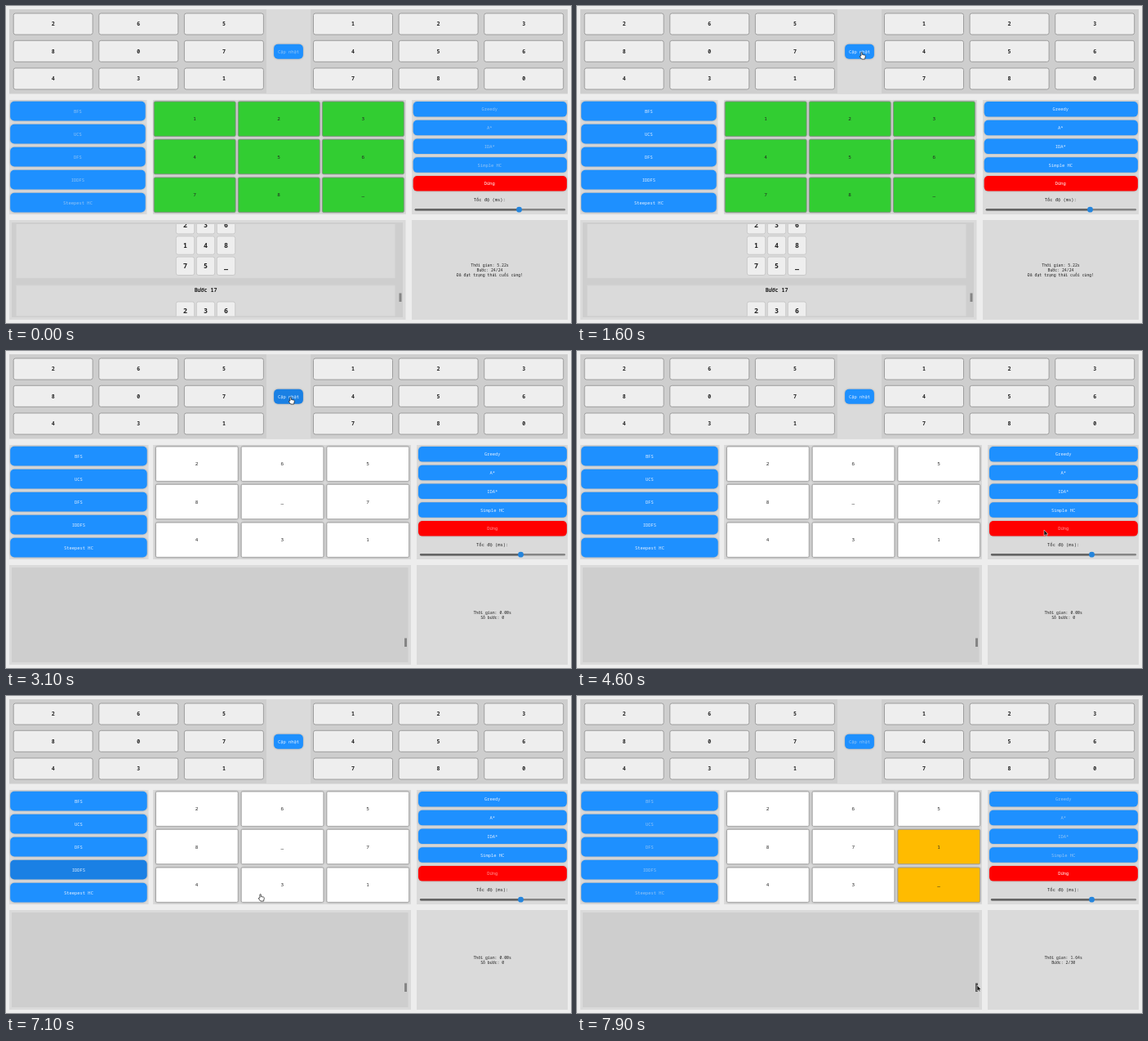
Animation of 692 by 388 pixels, one loop 8000 ms. Source, as an HTML page:

```html
<!DOCTYPE html>
<html lang="vi">
<head>
<meta charset="utf-8">
<style>
html, body { margin: 0; width: 100%; height: 100%; overflow: hidden; background: #ededed; }
svg { display: block; width: 692px; height: 388px; }
text { font-family: "Noto Sans Mono", "DejaVu Sans Mono", monospace; text-anchor: middle; white-space: pre; }
.lift { filter: drop-shadow(0 .6px .8px rgba(0, 0, 0, .25)); }
</style>
</head>
<body>
<svg viewBox="0 0 692 388">
  <defs>
    <clipPath id="list"><rect x="7" y="267" width="476" height="112.5"/></clipPath>
  </defs>
  <g id="scene"></g>
  <g id="cursor">
    <path id="arrow" d="M0 0V7.2L1.7 5.7L2.8 8L4 7.4L2.9 5.2H5Z" fill="#111" stroke="#fff" stroke-width=".5"/>
    <path id="hand" d="M1.2 4.6V.7Q1.8-.3 2.5.7V3L5.6 3.7Q6.4 4 6.2 5L5.5 8.2H2L-.3 5.3Q-.2 4 1.2 4.6Z" fill="#fff" stroke="#222" stroke-width=".7" transform="translate(-.9 -.8) scale(1.08)"/>
  </g>
</svg>
<script>
const LOOP = 8000, BLUE = '#1e90ff', HOVER = '#1a80e4', PANEL = '#dadada';
const $ = id => document.getElementById(id);
const rows = [9, 42.3, 76], boardRows = [117, 163.3, 210];

// Cursor stops: time, x, y, kind
const path = [
  [600, 590, 219, 'hand'], [900, 520, 160, 'hand'], [1300, 374, 75, 'hand'],
  [1500, 347.5, 57, 'hand'], [3800, 347.5, 57, 'hand'], [4300, 560, 236, 'arrow'],
  [4600, 572, 219, 'arrow'], [4800, 571, 217, 'arrow'], [5400, 347, 57, 'hand'],
  [5700, 345, 57, 'hand'], [6300, 130, 213, 'hand'], [6600, 131, 214, 'hand'],
  [7100, 310.5, 243, 'hand'], [7400, 484, 336, 'arrow'], [7500, 490, 354, 'arrow'],
  [8000, 490, 354, 'arrow']
];

const rect = (x, y, w, h, fill, r = 0, stroke = 'none') =>
  `<rect x="${x}" y="${y}" width="${w}" height="${h}" rx="${r}" fill="${fill}" stroke="${stroke}" stroke-width=".8"/>`;
const text = (s, x, y, size = 5.45, fill = '#222', weight = 400) =>
  `<text x="${x}" y="${y + size * .36}" font-size="${size}" fill="${fill}" font-weight="${weight}">${s}</text>`;
const button = (s, x, y, w, h, fill, ink, tx = x + w / 2) =>
  rect(x, y, w, h, fill, 5) + text(s, tx, y + h / 2, 5.45, ink);
const lift = body => `<g class="lift">${body}</g>`;
const inkFor = s => s.busy ? '#93c4f4' : '#e2efff';

function inputGrid(x, digits) {
  return [...digits].map((d, i) => {
    const cx = x + (i % 3) * 104.6, cy = rows[i / 3 | 0];
    return rect(cx, cy, 97, 26, '#eee', 2.5, '#8d8d8d') + text(d, cx + 48.5, cy + 13, 6.6, '#222', 700);
  }).join('');
}

function board(s) {
  const [x, step, w] = s.wide ? [183.5, 104.7, 100.7] : [181.3, 103.1, 99.8];
  const cells = [...s.board].map((d, i) => {
    const col = i % 3, cx = x + col * step, cy = boardRows[i / 3 | 0];
    const fill = s.done ? '#32cd32' : s.moved.includes(i) ? '#ffbb00' : '#fff';
    let cell = rect(cx, cy, w, 42.4, fill, 1.5, s.done ? '#7f8f7f' : '#989898');
    // Leftover edge of the narrower layout
    if (s.torn) cell += rect(cx + .4, cy - 1, 1.8 + col * 1.6, 44.4, '#dedede') +
      rect(cx + 1.8 + col * 1.6, cy, .8, 42.4, '#989898');
    return cell + text(d, cx + w / 2 - .2, cy + 21.2, 6);
  }).join('');
  return rect(180, 115, s.wide ? 316 : 310, 140, PANEL) + lift(cells);
}

function tiles(y, digits) {
  return [...digits].map((d, i) => {
    const x = 208.3 + (i % 3) * 25, ty = y + (i / 3 | 0) * 25.3;
    return rect(x, ty, 22.4, 22.4, '#eee', 2.5, '#c2c2c2') + text(d, x + 11.2, ty + 11.2, 8.3, '#222', 700);
  }).join('');
}

function log(s) {
  const w = s.wide ? 492 : 485.5;
  let out = rect(4, 262, w, 122, PANEL) + rect(7, 265, w - 6.5, 116, '#cecece');
  if (s.torn) out += rect(486, 265, 8.5, 116, PANEL) + rect(494, 262, 1.5, 122, '#d2d2d2');
  if (s.done) out += '<g clip-path="url(#list)">' +
    rect(12.5, 255, 464, 78, PANEL, 1, '#d4d4d4') + tiles(256.5, '23614875_') +
    rect(12.5, 342, 464, 60, PANEL, 1, '#d4d4d4') + text('Bước 17', 244.5, 348, 6.6, '#222', 700) +
    tiles(362, '236') + '</g>';
  return out + rect(s.wide ? 488 : 481.5, 351.5, 3, 10.5, s.dragging ? '#555' : '#858585');
}

function side(s) {
  const x = s.wide ? 503 : 497, bx = s.wide || s.torn ? 505 : 498.7, mid = s.wide ? 595.7 : 592.3;
  const cut = word => s.torn && word != 'Greedy' ? ' ' + word.slice(1) : word;
  let out = rect(x, 115, 688 - x, 140, PANEL), buttons = '';
  ['Greedy', 'A*', 'IDA*', 'Simple HC', 'Dừng'].forEach((name, i) => {
    const y = 117 + i * 22.75, stop = i == 4;
    const fill = stop ? (s.stopHover ? '#cc0000' : '#f00') : BLUE;
    if (s.torn) buttons += rect(498.7, y, 4, 18.6, fill, 1.5);
    buttons += button(cut(name), bx, y, 686.9 - bx, 18.6, fill, stop ? s.stopInk : inkFor(s), mid);
  });
  out += lift(buttons);
  const sx = bx + 2, knob = s.wide || s.torn ? 630.5 : 628.5;
  out += text(cut('Tốc độ (ms):'), mid, 236.8);
  if (s.torn) out += rect(503, 115, 1.5, 140, '#e6e6e6') + rect(500.7, 248, 2, 2.4, '#666');
  out += rect(sx, 248, 685 - sx, 2.4, '#858585', 1.2) + rect(sx, 248, knob - sx, 2.4, '#656565', 1.2) +
    `<circle cx="${knob}" cy="249.2" r="3.4" fill="#2585dc"/>`;
  out += rect(x, 262, 688 - x, 122, PANEL);
  const top = 323.2 - (s.status.length - 1) * 3;
  s.status.forEach((line, i) => out += text(line, s.done ? 592.5 : 595.7, top + i * 6, 4.85));
  return out;
}

function scene(s) {
  const lw = s.wide ? 167.5 : 165.5;
  const left = ['BFS', 'UCS', 'DFS', 'IDDFS', 'Steepest HC'].map((name, i) =>
    button(name, 5.2, 116.8 + i * 28, lw, 23.7, s.leftHover == i ? HOVER : BLUE, inkFor(s))).join('');
  return rect(4, 4, 684, 103.5, '#cecece') + rect(319, 4, 54, 103.5, PANEL) +
    inputGrid(9.2, '265807431') + inputGrid(376.5, '123456780') +
    lift(button('Cập nhật', 328.1, 46.7, 35.8, 18, s.updateHover ? HOVER : BLUE, inkFor(s))) +
    rect(4, 115, lw + 3, 140, PANEL) + lift(left) + board(s) + log(s) + side(s);
}

function stateAt(t) {
  const s = { moved: [], busy: false, wide: t >= 1900, stopInk: '#fff' };
  if (t < 1700) return {
    ...s, board: '12345678_', done: true, busy: t < 1500, stopHover: t >= 600 && t < 1500,
    status: ['Thời gian: 5.22s', 'Bước: 24/24', 'Đã đạt trạng thái cuối cùng!']
  };
  s.torn = t < 1900;
  s.status = ['Thời gian: 0.00s', 'Số bước: 0'];
  s.updateHover = t >= 2700 && t < 3900 || t >= 5400 && t < 5800;
  s.leftHover = t >= 6200 && t < 7500 ? 3 : -1;
  if (t >= 3000 && t < 7500) s.stopInk = '#ff9a9a';
  s.board = '2658_7431';
  if (t >= 7500) {
    s.busy = s.dragging = true;
    const second = t >= 7800;
    s.board = second ? '26587143_' : '26587_431';
    s.moved = second ? [5, 8] : [4, 5];
    s.status = second ? ['Thời gian: 1.64s', 'Bước: 2/30'] : ['Thời gian: 1.42s', 'Bước: 1/30'];
  }
  return s;
}

function moveCursor(t) {
  const i = path.findIndex(p => p[0] > t);
  $('cursor').style.display = i > 0 ? '' : 'none';
  if (i < 1) return;
  const a = path[i - 1], b = path[i], k = (t - a[0]) / (b[0] - a[0]);
  $('cursor').setAttribute('transform', `translate(${a[1] + (b[1] - a[1]) * k} ${a[2] + (b[2] - a[2]) * k})`);
  $('arrow').style.display = a[3] == 'arrow' ? '' : 'none';
  $('hand').style.display = a[3] == 'hand' ? '' : 'none';
}

let shown = '';
const start = performance.now();
function frame() {
  const t = Math.floor((performance.now() - start) % LOOP / 100) * 100;
  const s = stateAt(t), key = JSON.stringify(s);
  if (key != shown) {
    $('scene').innerHTML = scene(s);
    shown = key;
  }
  moveCursor(t);
  requestAnimationFrame(frame);
}
frame();
</script>
</body>
</html>
```
